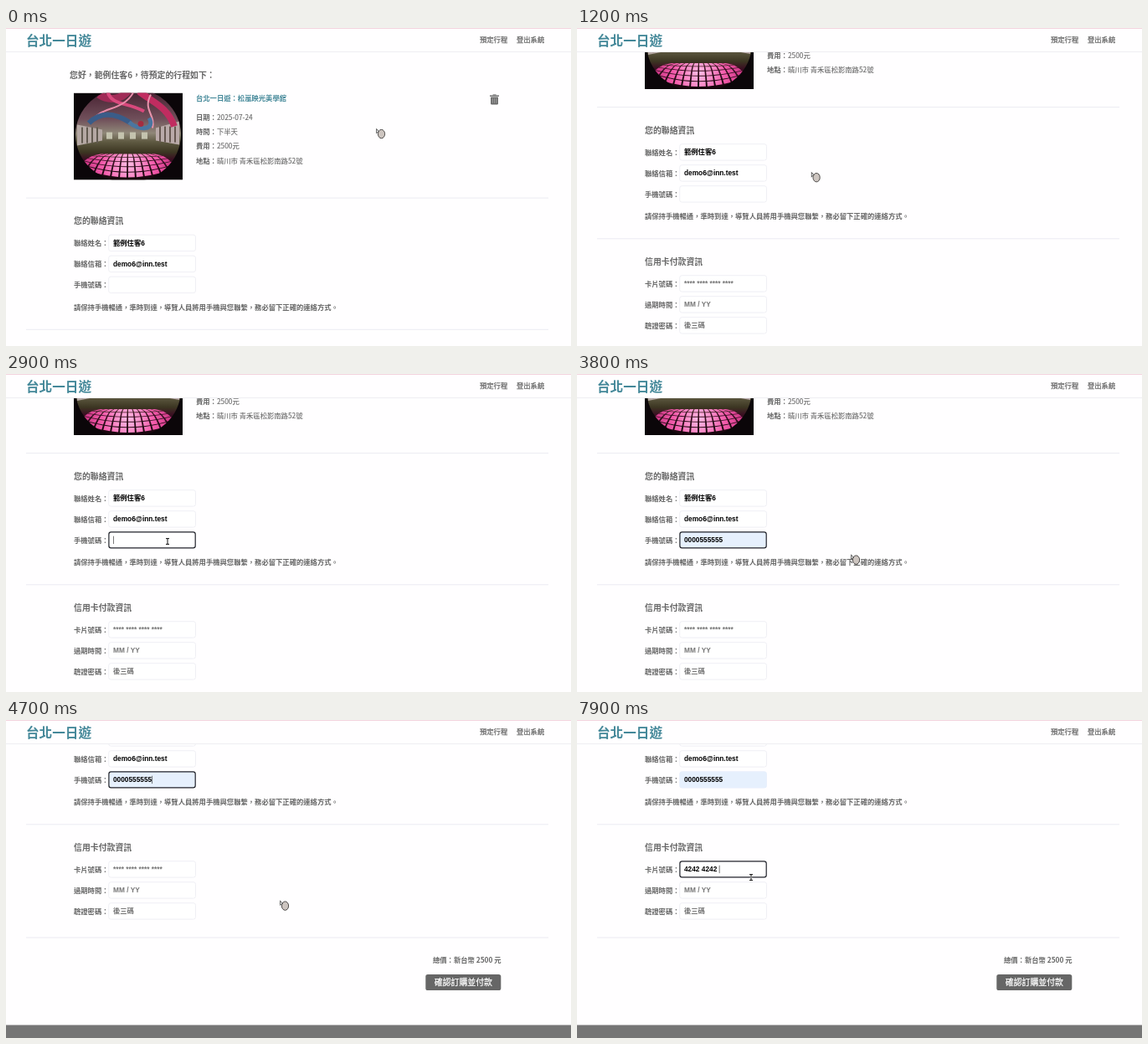
Write an HTML page with a canvas that moves like this. It is 675 px wide and 380 px high and loops after 8 s.

```html
<!DOCTYPE html>
<html lang="zh-Hant">
<head>
<meta charset="utf-8">
<title>預定行程</title>
<style>
  html, body { margin: 0; width: 100%; height: 100%; overflow: hidden; background: #fffeff; }
  canvas { display: block; width: 675px; height: 380px; }
</style>
</head>
<body>
<canvas id="stage" lang="zh-Hant"></canvas>
<script>
const W = 675, H = 380, LOOP = 8000;
const BODY = 8.32, HEAD = 9.88;
const CJK = '"Noto Sans CJK TC", "Noto Sans TC", "Noto Sans CJK", sans-serif';
const FIELD = '"Liberation Sans", Arial, "Noto Sans CJK TC", sans-serif';
const GREY = '#666666', TEAL = '#448899', PAPER = '#fffeff', RULE = '#ebebf2';

const canvas = document.getElementById('stage');
const ctx = canvas.getContext('2d');
const dpr = window.devicePixelRatio || 1;
canvas.width = W * dpr;
canvas.height = H * dpr;

const FOCUS_PHONE = 1450, FILL_PHONE = 3250, FOCUS_CARD = 5550;
const TYPE_START = 6500, TYPE_STEP = 180;

const fields = [
  { label: '聯絡姓名：', y: 247 },
  { label: '聯絡信箱：', y: 272 },
  { label: '手機號碼：', y: 297 },
  { label: '卡片號碼：', y: 404, hint: '**** **** **** ****' },
  { label: '過期時間：', y: 429, hint: 'MM / YY' },
  { label: '驗證密碼：', y: 454, hint: '後三碼' }
];

const pointerPath = [
  [0, 442.5, 120], [900, 442.5, 120], [1400, 193, 200], [3300, 193, 200],
  [3700, 327.5, 215.5], [4900, 327.5, 215.5], [5450, 208, 188], [LOOP, 208, 188]
];

const clamp = v => Math.min(1, Math.max(0, v));
const easeOut = p => 1 - (1 - p) ** 3;
const easeInOut = p => p * p * (3 - 2 * p);

function scrollAt(t) {
  return 108.5 * easeOut(clamp((t - 50) / 650)) + 127 * easeOut(clamp((t - 3850) / 800));
}

function pointerAt(t) {
  const i = pointerPath.findIndex(p => p[0] > t);
  const [t0, x0, y0] = pointerPath[i - 1], [t1, x1, y1] = pointerPath[i];
  const p = easeInOut((t - t0) / (t1 - t0));
  return [x0 + (x1 - x0) * p, y0 + (y1 - y0) * p];
}

// Digits in groups of four, each full group followed by a space
function cardAt(t) {
  const n = t < TYPE_START ? 0 : Math.min(8, Math.floor((t - TYPE_START) / TYPE_STEP) + 1);
  return '42424242'.slice(0, n).replace(/(\d{4})/g, '$1 ');
}

function caretOn(t) {
  let since = FOCUS_PHONE;
  if (t >= FILL_PHONE) since = FILL_PHONE;
  if (t >= FOCUS_CARD) since = FOCUS_CARD;
  if (t >= TYPE_START) since = TYPE_START + TYPE_STEP * Math.min(7, Math.floor((t - TYPE_START) / TYPE_STEP));
  return (t - since) % 1000 < 500;
}

// Draws text around a vertical centre and returns its right end;
// `heavy` thickens the strokes of the regular weight
function text(str, x, mid, { size = BODY, weight = 700, color = GREY, font = CJK, drop = 0.38, heavy = 0 } = {}) {
  ctx.font = `${weight} ${size}px ${font}`;
  ctx.fillStyle = color;
  ctx.fillText(str, x, mid + size * drop);
  if (heavy) {
    ctx.strokeStyle = color;
    ctx.lineWidth = heavy;
    ctx.strokeText(str, x, mid + size * drop);
  }
  return x + ctx.measureText(str).width;
}

function rect(x, y, w, h, color) {
  ctx.fillStyle = color;
  ctx.fillRect(x, y, w, h);
}

function box(x, y, w, h, r, fill, stroke, line = 1) {
  ctx.beginPath();
  ctx.roundRect(x, y, w, h, r);
  if (fill) { ctx.fillStyle = fill; ctx.fill(); }
  if (stroke) { ctx.strokeStyle = stroke; ctx.lineWidth = line; ctx.stroke(); }
}

function poly(color, ...pts) {
  ctx.beginPath();
  pts.forEach(([x, y]) => ctx.lineTo(x, y));
  ctx.closePath();
  ctx.fillStyle = color;
  ctx.fill();
}

function curve(color, width, x, y, ...c) {
  ctx.beginPath();
  ctx.moveTo(x, y);
  ctx.bezierCurveTo(...c);
  ctx.strokeStyle = color;
  ctx.lineWidth = width;
  ctx.stroke();
}

function gradient(g, ...stops) {
  stops.forEach(([p, c]) => g.addColorStop(p, c));
  return g;
}

// Light floor: a fan of bright tiles, wider towards the viewer
function lightFloor() {
  const glow = gradient(ctx.createRadialGradient(65, 84, 3, 65, 86, 58),
    [0, '#ffb4e0'], [0.5, '#f45cac'], [1, '#c02a78']);
  const edge = (v, u) => [65 + u * (33 + 27 * Math.sqrt(v)), 73 + v * (29 - 13 * u * u)];
  for (let row = 0; row < 5; row++) {
    for (let col = 0; col < 12; col++) {
      const v0 = (row / 5) ** 1.2, v1 = ((row + 0.84) / 5) ** 1.2;
      const u0 = col / 6 - 1, u1 = (col + 0.8) / 6 - 1;
      poly(glow, edge(v0, u0), edge(v0, u1), edge(v1, u1), edge(v1, u0));
    }
  }
}

function photo(x, y) {
  ctx.save();
  ctx.translate(x, y);
  ctx.beginPath();
  ctx.rect(0, 0, 130, 104);
  ctx.clip();
  rect(0, 0, 130, 104, '#0b0609');
  ctx.beginPath();
  ctx.ellipse(65, 50, 63, 57, 0, 0, Math.PI * 2);
  ctx.clip();
  rect(0, 0, 130, 104, gradient(ctx.createLinearGradient(0, 0, 0, 104),
    [0, '#4a2434'], [0.3, '#704f5a'], [0.46, '#8f8778'], [0.56, '#5f5a42'], [0.68, '#3c3622'], [0.76, '#3a1022'], [1, '#16060c']));
  poly('#b5a8a4', [4, 38], [34, 44], [34, 57], [4, 63]);
  poly('#b9a9a8', [98, 42], [126, 34], [126, 62], [98, 57]);
  for (let i = 0; i < 4; i++) {
    rect(9 + i * 6, 41, 2, 19, '#625a50');
    rect(102 + i * 6, 40, 2, 19, '#665750');
    rect(39 + i * 14, 47, 7, 8, '#c4c3ae');
  }
  curve('#a02a56', 9, 30, 2, 42, 10, 58, 8, 66, -4);
  curve('#d8487c', 4, 40, -2, 46, 16, 62, 10, 84, 22);
  curve('#e88aa8', 2, 20, 36, 32, 14, 58, 24, 72, -2);
  curve('#c02c60', 8, 78, -2, 92, 10, 112, 16, 120, 40);
  curve('#e894ac', 2, 92, 2, 82, 20, 98, 26, 94, 42);
  curve('#3a5c88', 6, 18, 36, 36, 18, 56, 28, 68, 36);
  curve('#4a76a0', 5, 66, 35, 78, 46, 98, 44, 90, 30);
  ctx.beginPath();
  ctx.arc(80, 37, 3.5, 0, 7);
  ctx.fillStyle = '#a42c40';
  ctx.fill();
  lightFloor();
  ctx.restore();
}

function trash(x, y) {
  const ink = '#6a6a6a';
  rect(x + 3.6, y, 4, 1, ink);
  rect(x, y + 1, 11, 1.4, ink);
  box(x + 1.1, y + 3.1, 8.8, 8.9, [0, 0, 1.2, 1.2], ink);
  for (let i = 0; i < 3; i++) rect(x + 2.9 + i * 2.3, y + 4.4, 0.6, 6, '#c4c4c4');
}

function field(i, value, { focus, filled, caret } = {}) {
  const f = fields[i], mid = f.y + 10;
  text(f.label, 81, mid + 0.2);
  const fill = filled ? '#e6f0fd' : '#ffffff';
  if (focus) box(122.9, f.y + 0.3, 103.3, 19.1, 2.6, fill, '#20222a', 1.2);
  else box(122.7, f.y + 0.2, 103.8, 19.4, 2.6, fill, filled ? '#e6eefb' : RULE, 0.8);
  const end = text(value || f.hint || '', 128, mid,
    { font: FIELD, drop: 0.35, color: value ? '#000000' : '#757575' });
  if (caret) rect(value ? end + 0.2 : 128, mid - 4.8, 0.6, 9.4, '#222222');
}

function page(t) {
  text('您好，範例住客6，待預定的行程如下：', 76, 56.5, { size: HEAD });
  photo(81, 77.6);
  text('台北一日遊：松嵐映光美學館', 227, 84.3, { color: TEAL });
  [['日期：', '2025-07-24'], ['時間：', '下半天'], ['費用：', '2500元'], ['地點：', '晴川市 青禾區松影南路52號']]
    .forEach(([name, value], i) => {
      const mid = 106.5 + i * 17.35;
      text(value, text(name, 227, mid), mid, { weight: 400, heavy: 0.1 });
    });
  trash(578, 79.4);
  [202.6, 359.8, 495].forEach(y => rect(24, y, 624, 1, RULE));

  const onPhone = t >= FOCUS_PHONE && t < FOCUS_CARD, onCard = t >= FOCUS_CARD;
  const phoneSet = t >= FILL_PHONE, blink = caretOn(t);
  text('您的聯絡資訊', 81, 230.5, { size: HEAD });
  field(0, '範例住客6');
  field(1, 'demo6@inn.test');
  field(2, phoneSet ? '0000555555' : '', { focus: onPhone, filled: phoneSet, caret: onPhone && blink });
  text('請保持手機暢通，準時到達，導覽人員將用手機與您聯繫，務必留下正確的連絡方式。', 81, 333.6);

  text('信用卡付款資訊', 81, 388.2, { size: HEAD });
  field(3, cardAt(t), { focus: onCard, caret: onCard && blink });
  field(4);
  field(5);

  text('總價：新台幣 2500 元', 510, 522.8);
  box(501.3, 539.6, 90, 19, 2.6, GREY);
  text('確認訂購並付款', 511.8, 549, { size: HEAD, weight: 400, color: '#ffffff', heavy: 0.25 });
  rect(0, 600, W, 60, '#757575');
}

function header() {
  rect(0, 0, W, 28, PAPER);
  rect(0, 0, W, 1, '#f3d3de');
  rect(0, 28, W, 1, '#eeeef2');
  text('台北一日遊', 24, 15.1, { size: 15.6, color: TEAL });
  text('預定行程', 566, 14.2, { weight: 400, heavy: 0.25 });
  text('登出系統', 610, 14.2, { weight: 400, heavy: 0.25 });
}

function pointer(x, y, scroll) {
  const overField = x > 122 && x < 227 &&
    fields.some(f => y >= f.y - scroll - 0.5 && y <= f.y - scroll + 20.5);
  if (overField) {
    for (const [grow, color] of [[0.6, '#ffffff'], [0, '#111111']]) {
      rect(x - 0.5 - grow, y - 3.6 - grow, 1 + 2 * grow, 7.2 + 2 * grow, color);
      [-3.9, 2.9].forEach(d => rect(x - 2 - grow, y + d - grow, 4 + 2 * grow, 1 + 2 * grow, color));
    }
    return;
  }
  ctx.beginPath();
  ctx.ellipse(x + 6, y + 6.6, 4.1, 5.2, 0, 0, Math.PI * 2);
  ctx.fillStyle = '#cdc5c0';
  ctx.fill();
  ctx.strokeStyle = '#4c4948';
  ctx.lineWidth = 1;
  ctx.stroke();
  poly('#4c4c4c', [x - 0.3, y - 0.2], [x + 3.6, y + 3.8], [x + 1.9, y + 4.4], [x - 0.3, y + 6.6]);
  poly('#ffffff', [x + 0.5, y + 1.7], [x + 2.3, y + 3.5], [x + 0.5, y + 4.8]);
}

function draw(t) {
  const scroll = scrollAt(t);
  ctx.setTransform(dpr, 0, 0, dpr, 0, 0);
  rect(0, 0, W, H, PAPER);
  ctx.save();
  ctx.translate(0, -scroll);
  page(t);
  ctx.restore();
  header();
  pointer(...pointerAt(t), scroll);
}

const start = performance.now();
function tick() {
  draw((performance.now() - start) % LOOP);
  requestAnimationFrame(tick);
}
tick();
</script>
</body>
</html>
```
